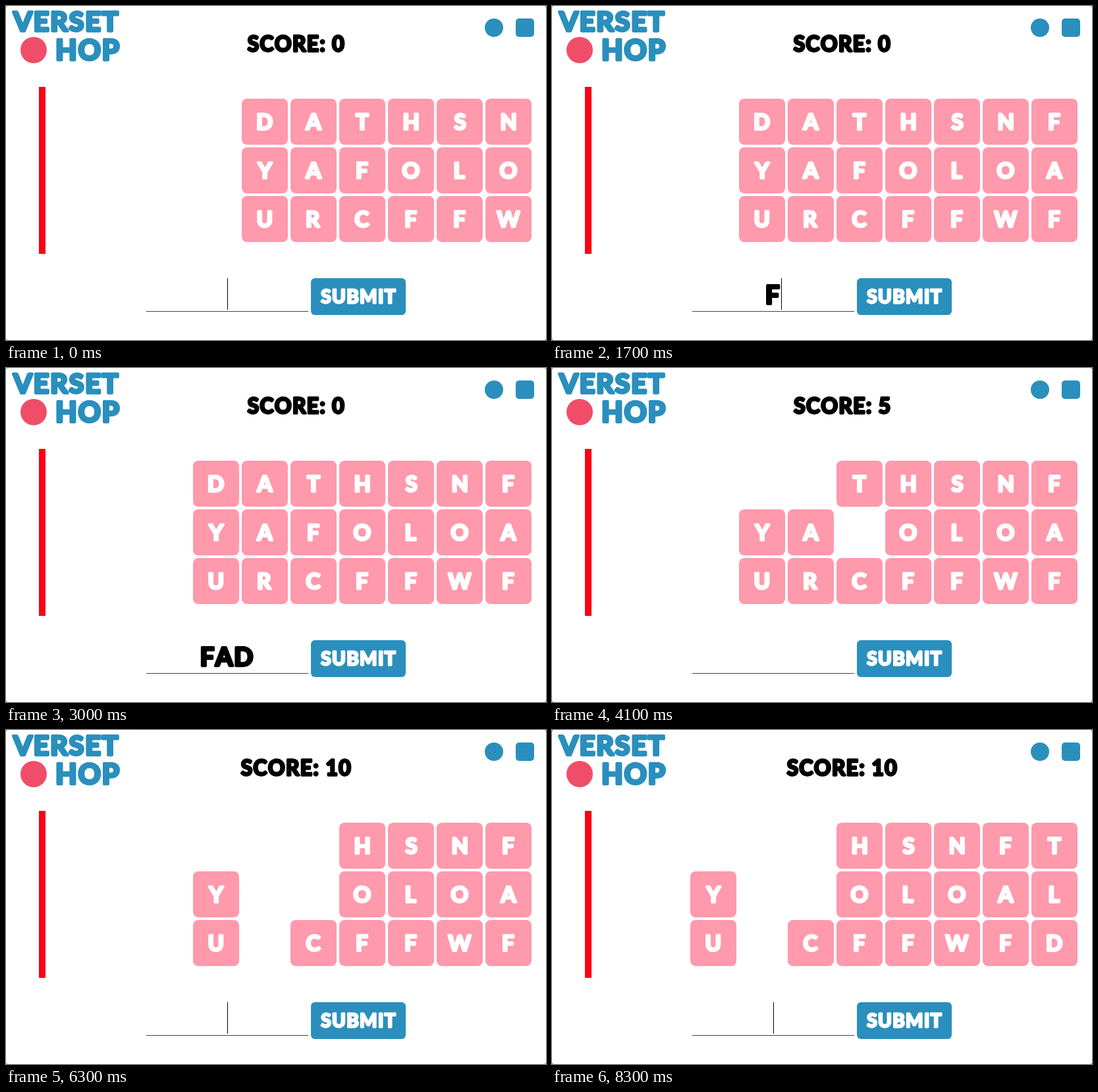
These frames come from a looping animation (820x508 px, 8400 ms). An HTML page with a canvas:

```html
<!DOCTYPE html>
<html lang="en">
<head>
<meta charset="utf-8">
<title>Word game</title>
<style>
  html, body { margin: 0; width: 820px; height: 508px; overflow: hidden; background: #777; }
  canvas { display: block; background: #fff; border-radius: 3px; }
</style>
</head>
<body>
<canvas id="stage" width="820" height="508"></canvas>
<script>
const ctx = document.getElementById('stage').getContext('2d');
const LOOP = 8400;
const BLUE = '#2a8fbd', PINK = '#ff99ac', RED = '#fb0012', ROSE = '#f04d68';

// The board after each accepted word; spaces are used-up tiles.
const boards = [
  { at: 0, score: 0, rows: ['DATHSNFT', 'YAFOLOAL', 'URCFFWFD'] },
  { at: 3200, score: 5, rows: ['  THSNFT', 'YA OLOAL', 'URCFFWFD'] },
  { at: 5900, score: 10, rows: ['   HSNFT', 'Y  OLOAL', 'U CFFWFD'] }
];
const columns = [{ at: 0, n: 6 }, { at: 300, n: 7 }, { at: 7300, n: 8 }];

// Each edit restarts the caret's blink.
const edits = [
  { at: -400, text: '' },
  { at: 1700, text: 'F' }, { at: 1900, text: 'FA' }, { at: 2200, text: 'FAD' },
  { at: 3200, text: '' },
  { at: 4600, text: 'T' }, { at: 4800, text: 'TA' }, { at: 5000, text: 'TAR' },
  { at: 5900, text: '' }
];

const current = (list, t) => list.filter(e => e.at <= t).pop();

function box(x, y, w, h, color, r = 0) {
  ctx.fillStyle = color;
  ctx.beginPath();
  ctx.roundRect(x, y, w, h, r);
  ctx.fill();
}

function disc(x, y, r, color) {
  box(x - r, y - r, 2 * r, 2 * r, color, r);
}

// Thick rounded lettering whose ink is centred on (x, y); returns its advance width.
function label(text, x, y, size, color) {
  ctx.font = `bold ${size}px Lato, "Open Sans", sans-serif`;
  ctx.letterSpacing = size * 0.05 + 'px';
  ctx.fontKerning = 'none';
  ctx.textAlign = 'left';
  ctx.lineJoin = 'round';
  ctx.lineWidth = size * 0.105;
  ctx.fillStyle = ctx.strokeStyle = color;
  const m = ctx.measureText(text);
  const left = x - (m.actualBoundingBoxRight - m.actualBoundingBoxLeft) / 2;
  const base = y + size * 0.358;
  ctx.strokeText(text, left, base);
  ctx.fillText(text, left, base);
  return m.width;
}

function drawHeader(score) {
  label('VERSET', 90, 23, 41, BLUE);
  disc(42, 67, 20, ROSE);
  label('HOP', 125, 67, 42, BLUE);
  label('SCORE: ' + score, 440, 57.5, 31.5, '#000');
  disc(741, 33, 14, BLUE);
  box(774, 19, 28, 28, BLUE, 5);
}

function drawBoard(rows, n) {
  box(50, 123, 10, 254, RED);
  rows.forEach((row, r) => {
    for (let c = 0; c < n; c++) {
      if (row[c] === ' ') continue;
      const x = 728 - 74 * (n - 1 - c), y = 141 + 74 * r;
      box(x, y, 70, 70, PINK, 8);
      label(row[c], x + 35, y + 35.5, 33, '#fff');
    }
  });
}

function drawInput(t) {
  const { at, text } = current(edits, t);
  box(213, 464, 246, 1, '#444');
  const width = text ? label(text, 336, 439, 38, '#000') : 0;
  if ((t - at) % 1000 < 500) box(Math.round(336 + width / 2), 414, 1, 48, '#000');
  box(463, 414, 144, 56, BLUE, 6);
  label('SUBMIT', 535, 442, 28, '#fff');
}

function draw(t) {
  const { score, rows } = current(boards, t);
  ctx.clearRect(0, 0, 820, 508);
  drawHeader(score);
  drawBoard(rows, current(columns, t).n);
  drawInput(t);
}

const start = performance.now();
function tick() {
  draw((performance.now() - start) % LOOP);
  requestAnimationFrame(tick);
}
tick();
</script>
</body>
</html>
```
